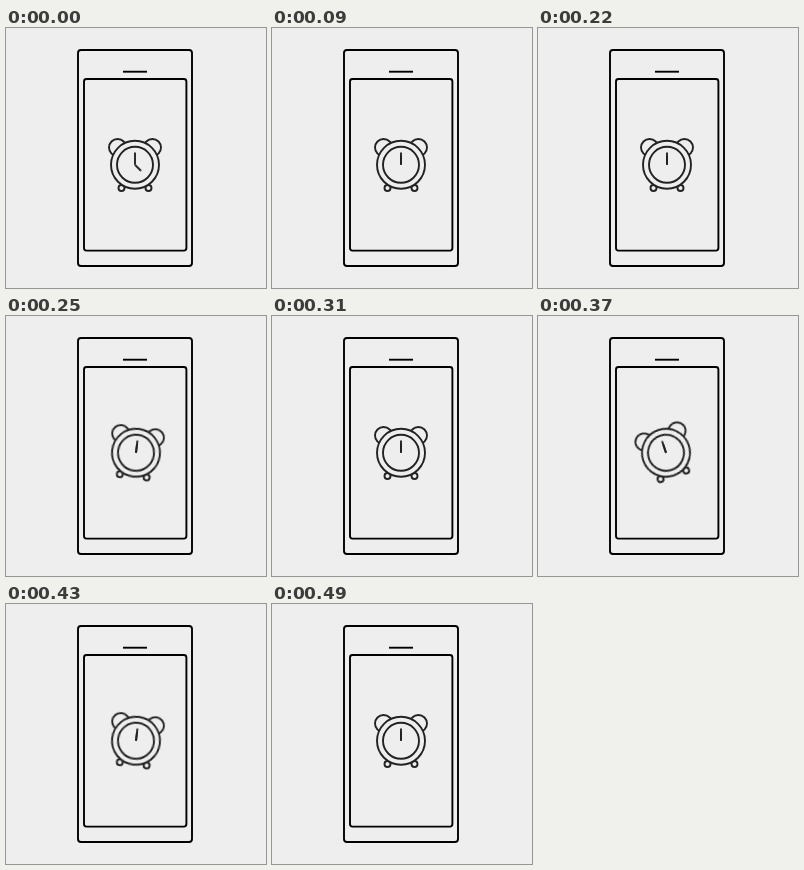
Recreate the animation shown at these times as an HTML page. Size 260 by 260 pixels, loop 1120 ms.

```html
<!DOCTYPE html>
<html lang="en">
<head>
<meta charset="utf-8">
<title>Phone alarm</title>
<style>
  html, body { margin: 0; width: 100%; height: 100%; overflow: hidden; background: #eee; }
  svg { display: block; width: 100vw; height: 100vh; }
  .phone { fill: none; stroke: #000; stroke-width: 1.9; }
  .clock { fill: #eee; stroke: #222; stroke-width: 1.9; }
  .clock, .hour { transform-origin: 129px 136.8px; }
  .clock { animation: ring 1120ms step-end infinite; }
  .hour { animation: sweep 1120ms step-end infinite; }

  /* the short hand runs up to twelve */
  @keyframes sweep {
    0% { transform: rotate(135deg); }
    2.67% { transform: rotate(210deg); }
    5.35% { transform: rotate(285deg); }
    8.03%, 100% { transform: rotate(360deg); }
  }

  /* two shakes, left then right */
  @keyframes ring {
    0%, 19.64%, 27.67%, 35.71%, 43.74%, 100% { transform: none; }
    14.28%, 30.35% { transform: translateX(-1px) rotate(-4.7deg); }
    16.96%, 33.03% { transform: translateX(-1px) rotate(-18.5deg); }
    22.32%, 38.39% { transform: translateX(1px) rotate(6.8deg); }
    24.99%, 41.07% { transform: translateX(1px) rotate(18.5deg); }
  }
</style>
</head>
<body>
<svg viewBox="0 0 260 260">
  <g class="phone">
    <rect x="72" y="22" width="114" height="216" rx="3"/>
    <rect x="78" y="51" width="102.4" height="171.6" rx="2.5"/>
    <path d="M117 43.7H141"/>
  </g>
  <g class="clock">
    <circle cx="111.6" cy="119.6" r="8.6"/>
    <circle cx="146.4" cy="119.6" r="8.6"/>
    <circle cx="115.5" cy="160" r="3"/>
    <circle cx="142.5" cy="160" r="3"/>
    <circle cx="129" cy="136.8" r="24"/>
    <circle cx="129" cy="136.8" r="18"/>
    <path d="M129 136.8V124.5"/>
    <path class="hour" d="M129 136.8V128.2"/>
  </g>
</svg>
</body>
</html>
```
